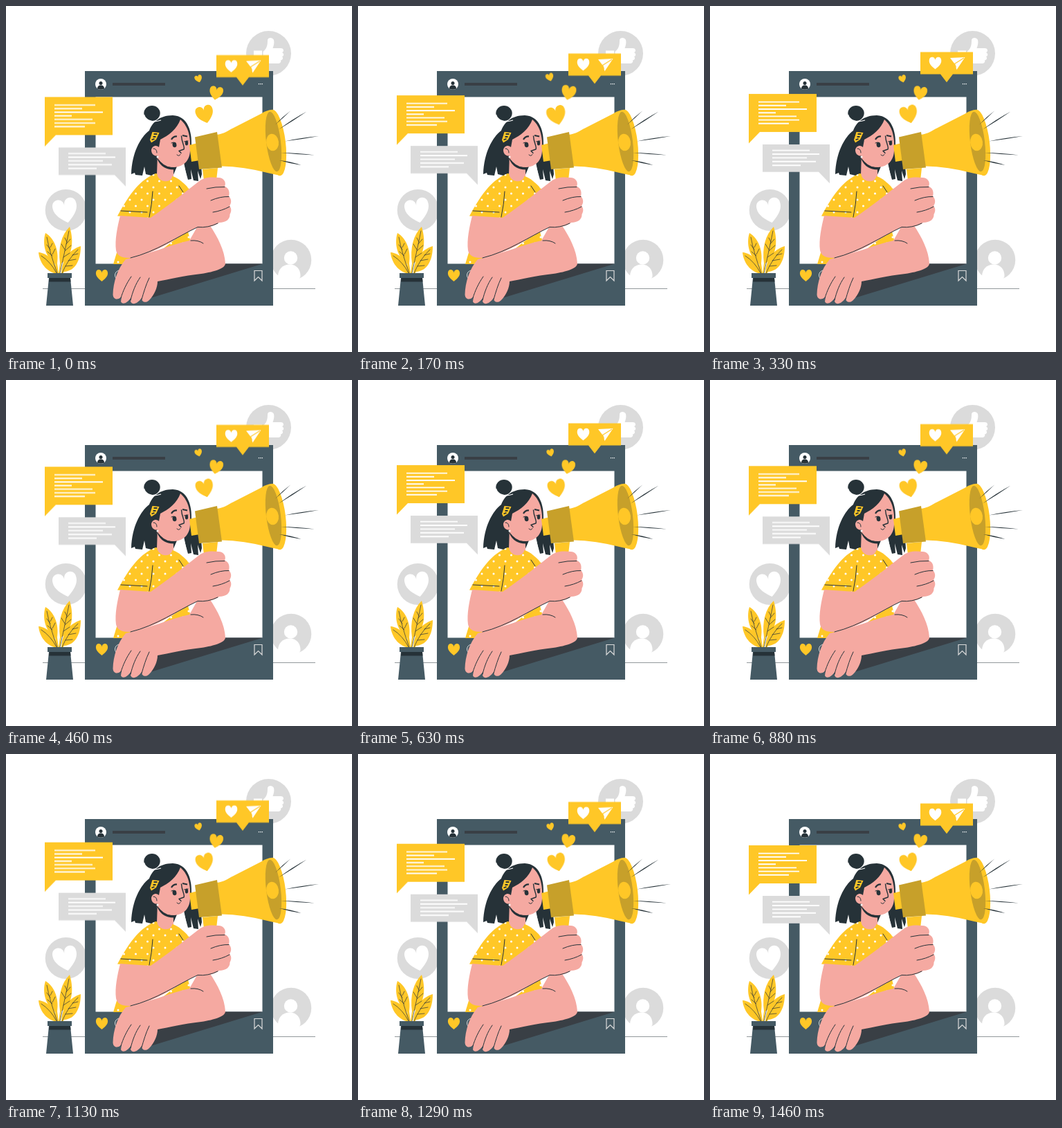
An HTML page for the animation above (1500 ms loop, 500 by 500 pixels).

```html
<!DOCTYPE html>
<html lang="en">
<head>
<meta charset="utf-8">
<title>Megaphone post</title>
<style>
html, body { margin: 0; width: 100%; height: 100%; overflow: hidden; background: #fff; }
svg { display: block; width: 100%; height: 100%; }
.y { fill: #ffc727; }
.gold { fill: #c7a02a; }
.g { fill: #dbdbdb; }
.w { fill: #fff; }
.slate { fill: #455a64; }
.ink { fill: #263238; }
.skin { fill: #f5a9a1; }
.line { fill: none; stroke: #263238; stroke-width: 1; stroke-linecap: round; stroke-linejoin: round; }
.vein { fill: none; stroke: #263238; stroke-width: .7; stroke-linecap: round; }
.text { fill: none; stroke: #fff; stroke-width: 1.9; }
.float { animation: float 1.5s linear -40ms infinite; }
.beat { transform-origin: 293px 135px; animation: beat 1.5s linear infinite; }
@keyframes float { 50% { transform: translateY(-10px); } }
@keyframes beat { 0%, 15%, 100% { transform: scale(1); } 10% { transform: scale(1.1); } }
</style>
</head>
<body>
<svg viewBox="0 0 500 500">
<defs>
  <path id="heart" d="M0 10C-4.500 6.500-10 2-10-4C-10-8-8-10-5-10C-2-10 0-7.500 0-4.500C0-7.500 2-10 5-10C8-10 10-8 10-4C10 2 4.500 6.500 0 10Z"/>
  <pattern id="dots" width="17" height="18" patternUnits="userSpaceOnUse" patternTransform="translate(5 6)">
    <circle cx="4" cy="4" r="1.500" fill="#fff"/>
    <circle cx="12.500" cy="13" r="1.500" fill="#fff"/>
  </pattern>
  <path id="shirt" d="M216 242C195 251 180 268 161 303.500L209 307L240 300L268 268C256 254 249 249 241 246Z"/>
  <path id="hem" d="M165 340L155 373H173L182 362Z"/>
  <path id="waist" d="M228 350L270 317L263 326L267 342L240 350Z"/>
</defs>

<path d="M53 408.500H447" stroke="#263238" stroke-width=".5"/>

<!-- badges -->
<circle class="g" cx="379.500" cy="68.500" r="32.500"/>
<path class="w" d="M358 64.500H370V82H358ZM371.500 66C378 61 378 54 378 49C379 45 385 45 387 49C388 53 387 57 385.500 61H397C402 61 402 66 399 67C402 69 402 72 399 73C401 75 400 78 397 78.500C398 81 396 83 393 83H381C377 83 374 81 371.500 80Z"/>
<circle class="g" cx="412" cy="367" r="29.300"/>
<circle class="w" cx="411.500" cy="364" r="9.700"/>
<path class="w" d="M393 391C393 380 400 373.500 410 373.500C420 373.500 426 381 425.500 391L422 398H396Z"/>
<circle class="g" cx="86.700" cy="295" r="30"/>
<use href="#heart" class="w" transform="translate(86 296) rotate(-12) scale(1.750)"/>

<!-- post frame -->
<path class="slate" d="M114 94H386V433H114ZM129.500 131.500V372.500H370.500V131.500Z" fill-rule="evenodd"/>
<circle class="w" cx="137" cy="113" r="8"/>
<circle class="ink" cx="137" cy="111.500" r="2.500"/>
<path class="ink" d="M132 119.500C132 116 134 114.500 137 114.500C140 114.500 142 116 142 119.500Q137 122 132 119.500Z"/>
<path d="M154 113H230" stroke="#393f45" stroke-width="4"/>
<path d="M364.800 112.700H371" stroke="#fff" stroke-width="1.300" stroke-dasharray="1.300 1.100"/>
<path d="M371 372.500L212 421L196 424L230 372.500Z" fill="#393f45"/>
<use href="#heart" class="y" transform="translate(138.500 389.500) scale(.86)"/>
<circle cx="164.500" cy="389" r="7" fill="none" stroke="#dbdbdb"/>
<path d="M359 382.500H370V397L364.500 391.500L359 397Z" fill="none" stroke="#dbdbdb" stroke-width="1.200"/>

<!-- plant -->
<g class="y">
  <path d="M73 387C62 385 49 375 47 356C60 357 72 369 75 387Z"/>
  <path d="M74 387L71 373C57 363 52 344 57 328C69 335 77 352 74 372L76 387Z"/>
  <path d="M80 387C81 365 92 352 108 347C108 369 99 383 84 384L82 387Z"/>
  <path d="M76 387L78 372C75 349 80 331 92 319C99 342 95 364 80 372L78 387Z"/>
</g>
<path class="vein" d="M51 361Q65 370 73 386M59 334Q63 356 74 386M64 352L59 345M67 361L60 355M64 349L67 343M67 359L71 351"/>
<path class="vein" d="M91 325Q86 350 78 386M87 344L93 337M85 354L94 346M83 363L92 357M88 341L85 335M85 352L80 344M104 352Q90 365 81 386M96 360L104 358M90 368L101 366M86 376L96 375"/>
<path class="slate" d="M60 386H95V393H60ZM62 393H93L97 433H58Z"/>
<path class="ink" d="M62.500 393H93L93.500 398.500H62Z"/>

<!-- head -->
<path class="ink" d="M241 158C221 158 211 169 207 180C194 190 182 212 181 243L186 241L187 244L197 245L200 232L202 243L218 247L257 247L258 233L263 251L268 250L267 236L271 252L278 253L277 238L281 250L283 243C283 228 276 213 268 202C269 182 263 159 241 158Z"/>
<path class="w" d="M219 246L241 246L247 232L257 226L262 251L257 254L241 253Z"/>
<ellipse class="ink" cx="211" cy="155" rx="11.700" ry="11"/>
<path d="M199.500 157C202 166 213 169 224 165" fill="none" stroke="#fff" stroke-width="1.200"/>
<path class="skin" d="M219 212H242V246C240 257 221 257 218 245Z"/>
<path class="ink" d="M219 220Q230 235 242 232V236.500Q225 236 219 222Z"/>
<path class="skin" d="M252 164C247 178 235 187 223 193L221 204C217 200 211 202 210 208C210 215 216 218 220 216C224 226 232 233 243 233C258 232 266 222 266 208C267 193 265 175 252 164Z"/>
<path class="line" d="M213 206Q218 206 218 212M247 215Q250 218 252 214.500"/>
<path class="line" d="M253.500 188C254 198 259 204 257 207L250 209.500L253 212.500" style="stroke-width:1.400"/>
<path d="M239 193Q242 188 247 188.500M255 187L262 188.500" fill="none" stroke="#263238" stroke-width="2.200"/>
<ellipse class="ink" cx="243.500" cy="200.500" rx="2.900" ry="3.800" transform="rotate(-10 243.500 200.500)"/>
<ellipse class="ink" cx="261" cy="198" rx="2.200" ry="3.600"/>
<path class="line" d="M239 198L242 197M257.500 196L263 195"/>
<circle class="w" cx="219" cy="218" r="1.500"/>
<path class="y" d="M211.500 182L221.500 183L217 193L210 197.500L208 193.500Z"/>
<path d="M213.500 185H218.500M212.500 189H216.500M210.500 193.500L214.500 191.800" stroke="#263238" stroke-width="1.900"/>

<!-- shirt -->
<g class="y"><use href="#shirt"/><use href="#hem"/><use href="#waist"/></g>
<g fill="url(#dots)"><use href="#shirt"/><use href="#hem"/><use href="#waist"/></g>
<path class="skin" d="M218 241L241 244Q239 255 228 253Q219 251 218 241Z"/>
<path class="line" d="M212 268Q211 286 207 305M166 296L204 298M250 260L256 269"/>

<!-- resting arm -->
<path class="skin" d="M173 366C205 359 238 345 265 339L277 318L294 316C306 334 316 353 317 372C317 379 302 384 282 387C255 390 236 395 219 398C219 407 214 418 207 425C202 430 196 428 196 422C190 430 183 433 180 427L181 421C175 430 168 432 166 427L167 420C161 426 155 424 154.500 417C155 399 161 380 173 366Z"/>
<path class="line" d="M181 391C174 401 169 412 166 422M194 392C187 402 183 413 180 425M207 393C202 403 199 414 196 424M267 339Q278 338 285 343"/>

<!-- megaphone -->
<path class="y" d="M284 236L306 234L304 252H286Z"/>
<path class="y" d="M265 201L277 198L280 223L268 225Z"/>
<path class="y" d="M304 186C315 185 321 180 328 176.500L369 155.500Q377 150 385 150L396 245L382 242Q340 231 309 231.500Z"/>
<ellipse class="y" cx="390.500" cy="197.500" rx="13.500" ry="48" transform="rotate(-7 390.500 197.500)"/>
<ellipse class="gold" cx="386.500" cy="196" rx="10.500" ry="43.500" transform="rotate(-7 386.500 196)"/>
<ellipse class="y" cx="385" cy="197" rx="9" ry="12.300" transform="rotate(-7 385 197)"/>
<path class="gold" d="M273 189.500L305 182L312 233.500L279 236Z"/>
<g class="ink">
  <path d="M389 171.500Q399 160.500 411 151.500Q400 162.500 389 171.500Z"/>
  <path d="M394 178.500Q413 164 434.500 152.500Q415 166 394 178.500Z"/>
  <path d="M403 195.500Q427 190 452 188Q428 192.500 403 195.500Z"/>
  <path d="M397 212Q421 212 446 215.500Q421 214.500 397 212Z"/>
  <path d="M395 223Q411 224.500 426.500 230Q410 227.500 395 223Z"/>
</g>

<!-- raised arm -->
<path class="skin" d="M165 303C161 319 157 338 159 353C161 365 177 367 198 360C230 349 252 331 277 319.500C290 321 302 318 308 313C318 313 324 308 323.500 301C326 297 326 292 323 289C327 283 325 278 322 275C324 268 321 262 316 261C319 254 314 248 307 248C296 247 287 247 278 254C255 272 231 291 209 306Z"/>
<path class="line" d="M290 264Q303 261 316 261.500M296 281Q310 275 322 275.500M299 298Q312 296 323 290M180 364C217 355 248 333 277 319.500Q292 321 306 314"/>

<!-- hearts -->
<g class="beat y">
  <use href="#heart" transform="translate(278.200 105.200) rotate(-17) scale(.53)"/>
  <use href="#heart" transform="translate(303.500 126) rotate(10) scale(.98)"/>
  <use href="#heart" transform="translate(287.500 156.800) rotate(-15) scale(1.270)"/>
</g>

<!-- bubbles -->
<g class="float">
  <path class="y" d="M56 132H154V187H72L56 203.500Z"/>
  <path class="text" d="M70 143.600H129M70 148.800H110M70 154H140M70 159.200H95M70 164.400H125M70 169.600H129M70 174.800H114"/>
  <path class="g" d="M76 205H173V261.200L157 244.700H76Z"/>
  <path class="text" d="M90 213.600H144M90 219H158M90 224.400H140M90 229.800H153M90 235.200H131"/>
  <path class="y" d="M304 71.400H380V103.400H351L342 115.200L333 103.400H304Z"/>
  <use href="#heart" class="w" transform="translate(325.500 87.500) scale(.88)"/>
  <path class="w" d="M347 80L368.500 79L356.500 97L353.500 88.500Z"/>
  <path d="M367 80L353.500 88.500L355.500 93.500" fill="none" stroke="#ffc727" stroke-width="1.100"/>
</g>
</svg>
</body>
</html>
```
